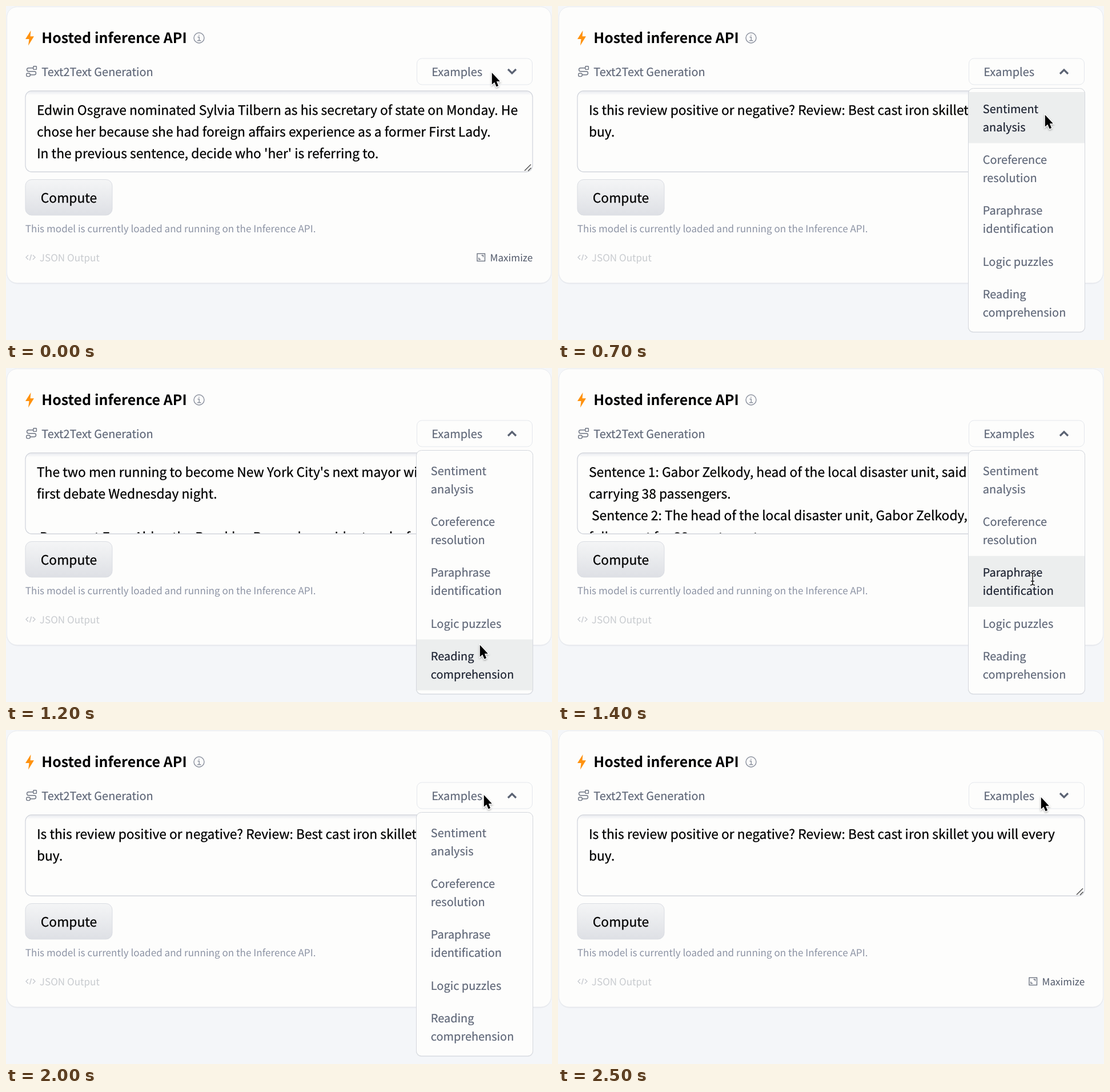
An HTML page that plays this animation: 956 px wide and 586 px high, repeating every 2600 ms.

```html
<!DOCTYPE html>
<html lang="en">
<head>
<meta charset="utf-8">
<title>Inference widget</title>
<style>
  html, body { margin: 0; width: 100%; height: 100%; overflow: hidden; background: #f4f6f9; }
  svg { display: block; }
  text {
    font-family: "Noto Sans CJK JP", "Noto Sans CJK SC", "Noto Sans CJK KR", "Noto Sans CJK TC", "Noto Sans CJK", "Noto Sans", sans-serif;
    white-space: pre;
    text-rendering: geometricPrecision;
  }
  .title { font-size: 25px; font-weight: 700; }
  .body { font-size: 22.83px; stroke: #000; stroke-width: .3; }
  .label { font-size: 19.95px; fill: #5f6778; stroke: #5f6778; stroke-width: .2; }
  .label.on { fill: #1b2130; stroke: #1b2130; }
  .small { font-size: 17.1px; }
  .icon { fill: none; stroke: #6b7280; stroke-width: 1.4; }
</style>
</head>
<body>
<svg width="956" height="586" viewBox="0 0 956 586">
  <defs>
    <linearGradient id="btn" x2="0" y2="1">
      <stop stop-color="#f4f5f6"/><stop offset="1" stop-color="#dee0e5"/>
    </linearGradient>
    <linearGradient id="inset" x2="0" y2="1">
      <stop stop-color="#e9ebf0"/><stop offset="1" stop-color="#fdfdfc"/>
    </linearGradient>
    <clipPath id="box"><rect x="35" y="150" width="886" height="140" rx="10"/></clipPath>
    <clipPath id="menuBox"><rect x="718.5" y="144.5" width="204" height="427.5" rx="9"/></clipPath>
    <filter id="shade" x="-50%" y="-50%" width="200%" height="200%">
      <feDropShadow dx="0" dy="1.5" stdDeviation="1.5" flood-opacity=".35"/>
    </filter>
  </defs>

  <rect x="1" y="2" width="954" height="486" rx="19" fill="#e9ebf0"/>
  <rect x="1.5" y="1.5" width="953" height="484.5" rx="18" fill="#fdfdfc" stroke="#e9ebef"/>

  <path d="M43.5 43L34 58H40.5L39 69.5L49 53.3H42.6Z" fill="#ff920f"/>
  <text class="title" x="62.3" y="65">Hosted inference API</text>
  <g class="icon" style="stroke:#8a909d">
    <circle cx="338" cy="56" r="9"/>
    <path d="M335.5 54.5H338.3V60.5M335 60.7H341.5M337.9 50.5V52.3"/>
  </g>

  <g class="icon">
    <rect x="47.8" y="105.8" width="5.6" height="5.6" rx=".8"/>
    <rect x="35.8" y="118" width="6.4" height="5.6" rx="2"/>
    <path d="M47.8 108.7H39.6A3 3 0 0 0 39.6 114.7H49.5A3 3 0 0 1 49.5 120.7H42.2"/>
  </g>
  <text class="label" x="62.3" y="122.7">Text2Text Generation</text>

  <rect x="719.5" y="92" width="202" height="46" rx="9" fill="#fdfdfc" stroke="#e4e7ec"/>
  <text class="label" x="745.3" y="122.7">Examples</text>
  <path id="chevron" fill="none" stroke="#5b6373" stroke-width="3.2"/>

  <rect x="34" y="149" width="888" height="142" rx="11" fill="#fdfdfc" stroke="#d3d6dd" stroke-width="1.3"/>
  <g clip-path="url(#box)">
    <rect x="34" y="149.5" width="888" height="7" fill="url(#inset)"/>
    <g id="lines"></g>
  </g>
  <path d="M908 289L919 278M914 289.5L919.5 284" stroke="#444" stroke-width="1.3"/>

  <rect x="34" y="304.5" width="152" height="62.5" rx="11" fill="url(#btn)" stroke="#d9dce2"/>
  <text class="body" x="60.8" y="345.3">Compute</text>
  <text class="small" x="33.8" y="396.5" fill="#8c93a4">This model is currently loaded and running on the Inference API.</text>

  <path class="icon" style="stroke:#c6c9cf" d="M39 437L35 441L39 445M47 437L51 441L47 445M44.5 436L41.5 446.5"/>
  <text class="small" x="58.8" y="447.5" fill="#c8cbcf">JSON Output</text>
  <g class="icon">
    <rect x="825" y="434.5" width="13.5" height="13"/>
    <path d="M832.5 437.5H835.5V440.5M828 441.5V444.5H831"/>
  </g>
  <text class="small" x="847.6" y="447.5" fill="#4f5768">Maximize</text>

  <g id="menu">
    <rect x="718" y="145" width="205" height="428" rx="9" fill="#dfe2e7"/>
    <rect x="718.5" y="144.5" width="204" height="427.5" rx="9" fill="#fdfdfc"/>
    <rect id="hover" x="718" width="205" fill="#eceeee" clip-path="url(#menuBox)"/>
    <rect x="718.5" y="144.5" width="204" height="427.5" rx="9" fill="none" stroke="#d4d7dd"/>
    <g id="items"></g>
  </g>

  <g id="cursor">
    <path id="arrow" filter="url(#shade)" d="M.8 1V21.8L5.3 17.7L8.6 25.5L12.1 24L8.9 16.3H14.9Z" stroke="#fff" stroke-width="2.4" paint-order="stroke"/>
    <g id="beam" fill="none">
      <path d="M-4 -11Q0 -11 0 -8Q0 -11 4 -11M0 -8V8M-4 11Q0 11 0 8Q0 11 4 11M-3 4H3" stroke="#fff" stroke-width="3.4"/>
      <path d="M-4 -11Q0 -11 0 -8Q0 -11 4 -11M0 -8V8M-4 11Q0 11 0 8Q0 11 4 11M-3 4H3" stroke="#111" stroke-width="1.5"/>
    </g>
  </g>
</svg>

<script>
const LOOP = 2600, STEP = 100, OPEN = 500, CLOSE = 2300;
const $ = id => document.getElementById(id);

const examples = [
  { label: ["Sentiment", "analysis"], top: 151, text: [
    "Is this review positive or negative? Review: Best cast iron skillet you will every",
    "buy."] },
  { label: ["Coreference", "resolution"], top: 240.5, text: [
    "Edwin Osgrave nominated Sylvia Tilbern as his secretary of state on Monday. He",
    "chose her because she had foreign affairs experience as a former First Lady.",
    "In the previous sentence, decide who 'her' is referring to."] },
  { label: ["Paraphrase", "identification"], top: 329.7, text: [
    "Sentence 1: Gabor Zelkody, head of the local disaster unit, said the coach was",
    "carrying 38 passengers.",
    " Sentence 2: The head of the local disaster unit, Gabor Zelkody, said the bus was",
    "full except for 38 empty seats."] },
  { label: ["Logic puzzles"], top: 419, text: [
    "On a shelf, there are five books: a gray book, a red book, a purple",
    "book, a blue book, and a black book.",
    " The red book is to the right of the gray book. The black book is to",
    "the left of the blue book."] },
  { label: ["Reading", "comprehension"], top: 476.3, text: [
    "The two men running to become New York City's next mayor will face off in their",
    "first debate Wednesday night.",
    "",
    " Democrat Evan Alder, the Brooklyn Borough president and a former"] }
];
const bottom = i => i < 4 ? examples[i + 1].top : 565.5;

// pointer path: time, x, y
const path = [
  [0, 850, 116], [400, 863, 109], [600, 859, 122], [700, 852, 190], [800, 846, 265],
  [900, 841, 331], [1200, 829, 485], [1300, 829, 440], [1400, 831, 370], [1600, 832, 240],
  [1800, 836, 150], [1900, 836, 122], [2000, 836, 113], [2500, 845, 117]
];

function addText(parent, str, cls, x, y) {
  const el = document.createElementNS("http://www.w3.org/2000/svg", "text");
  el.setAttribute("class", cls);
  el.setAttribute("x", x);
  el.setAttribute("y", y);
  el.textContent = str;
  parent.append(el);
  return el;
}

const lines = [0, 1, 2, 3].map(i => addText($("lines"), "", "body", 53.9, 191 + i * 38.16));
const items = examples.map(({ label, top }) =>
  label.map((s, i) => addText($("items"), s, "label", 743.8, top + 36.7 + i * 31.8)));

function pointer(t) {
  const i = Math.max(1, path.findIndex(p => p[0] >= t));
  const [t0, x0, y0] = path[i - 1], [t1, x1, y1] = path[i];
  const k = (t - t0) / (t1 - t0);
  return [x0 + (x1 - x0) * k, y0 + (y1 - y0) * k];
}

const show = (id, on) => $(id).style.display = on ? "" : "none";

function draw(t) {
  const [x, y] = pointer(t);
  const open = t >= OPEN && t < CLOSE;
  const over = open ? examples.findIndex((e, i) => y - 3 >= e.top && y - 3 < bottom(i)) : -1;
  const chosen = over >= 0 ? over : t < 1300 ? 1 : 0;
  const beam = t >= 1400 && t < 1600;

  lines.forEach((el, i) => el.textContent = examples[chosen].text[i] || "");
  items.forEach((row, i) => row.forEach(el => el.classList.toggle("on", i === over)));
  show("menu", open);
  show("hover", over >= 0);
  if (over >= 0) {
    $("hover").setAttribute("y", examples[over].top);
    $("hover").setAttribute("height", bottom(over) - examples[over].top);
  }
  $("chevron").setAttribute("d", open ? "M879 119L886 112L893 119" : "M879 111L886 118L893 111");
  show("arrow", !beam);
  show("beam", beam);
  $("cursor").setAttribute("transform", `translate(${x} ${y})`);
}

const start = performance.now();
function frame() {
  const t = (performance.now() - start) % LOOP;
  draw(Math.floor(t / STEP) * STEP);
  requestAnimationFrame(frame);
}
frame();
</script>
</body>
</html>
```
